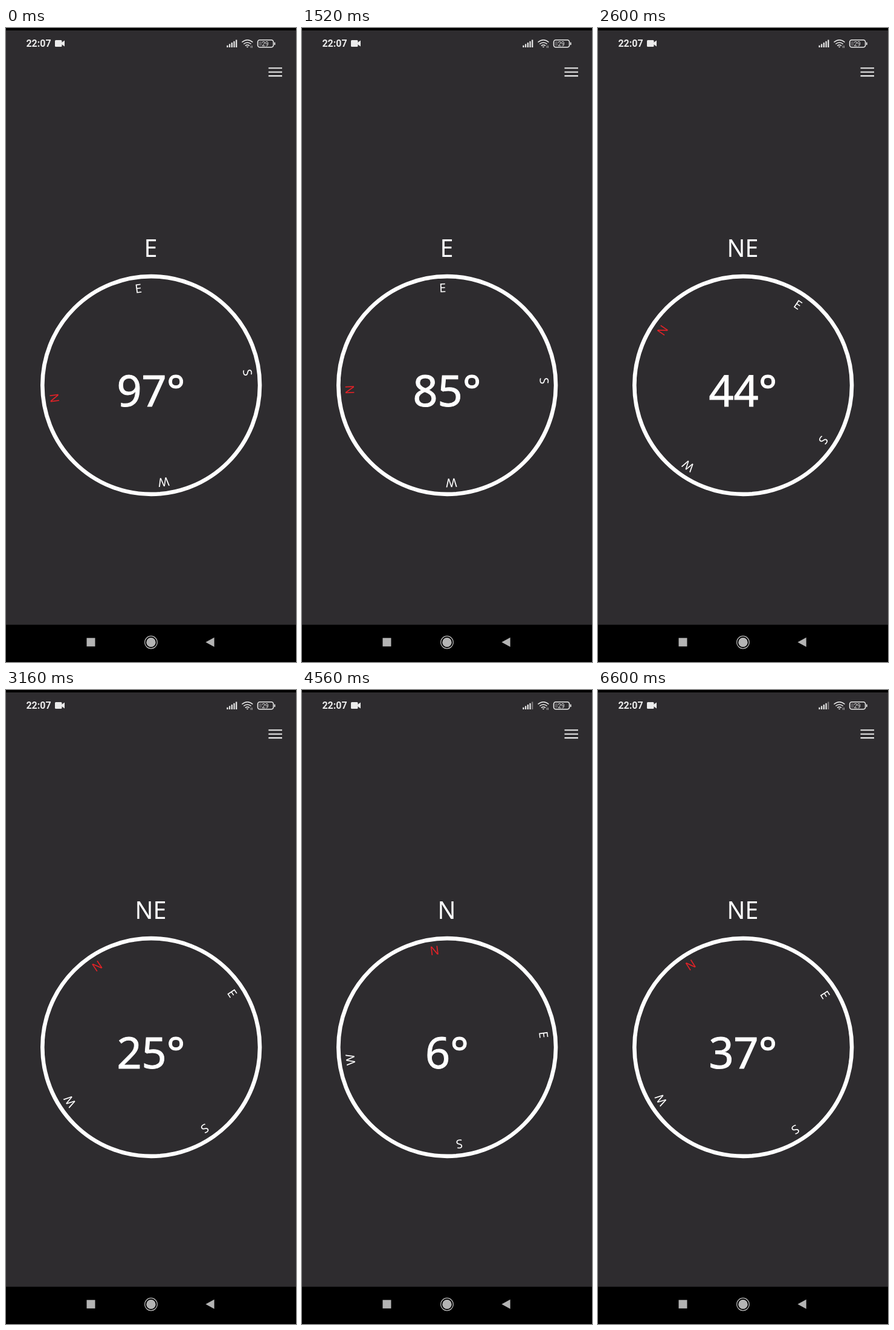
These frames come from a looping animation (480 px wide and 1047 px high, 6640 ms). An HTML page:

```html
<!DOCTYPE html>
<html lang="en">
<head>
<meta charset="utf-8">
<title>Compass</title>
<style>
  html, body { margin: 0; width: 100%; height: 100%; overflow: hidden; background: #000; }
  svg { display: block; width: 480px; height: 1047px; }
  text { font-family: "Noto Sans", "Open Sans", sans-serif; text-anchor: middle; fill: #fff; }
  #label { font-size: 39.5px; }
  #degrees { font-size: 72px; stroke: #fff; stroke-width: 1px; }
  #dial text { font-size: 20px; }
  #dial text:first-child { fill: #e32227; }
  #status text { font-family: Roboto, sans-serif; fill: #ececec; }
  .line { fill: none; stroke: #ececec; stroke-width: 1.6; }
</style>
</head>
<body>
<svg viewBox="0 0 480 1047">
  <rect y="4" width="480" height="981.5" fill="#2e2c2f"/>

  <g id="status" fill="#ececec">
    <text x="54" y="31" font-size="16" font-weight="700">22:07</text>
    <rect x="81" y="20" width="11.5" height="11" rx="1.5"/>
    <path d="M92 24L97 20.5V30.5L92 27Z"/>
    <g id="signal"></g>
    <path class="line" d="M390.5 23.5Q399.500 16 408.500 23.500M393.300 26.500Q399.500 21.500 405.700 26.500M396 29.300Q399.500 26.800 403 29.300"/>
    <path d="M397.500 30.500H401.500L399.500 32.500Z"/>
    <path d="M405.300 29V33M407.400 29V33" stroke="#aaa"/>
    <rect x="418.500" y="22" width="5" height="7.600" rx="1.500" fill="#59575a"/>
    <rect class="line" x="416.600" y="19.800" width="26" height="12" rx="3.500"/>
    <path class="line" d="M444.800 23.800V28"/>
    <text x="429" y="29.500" font-size="10">29</text>
  </g>
  <path class="line" d="M434.500 66.300h22.500m-22.500 6.400h22.500m-22.500 6.400h22.500" style="stroke-width: 2.1"/>

  <text id="label" x="239.600" y="378"></text>
  <circle cx="240.200" cy="590" r="179.900" fill="none" stroke="#fff" stroke-width="6.600"/>
  <g id="dial"></g>
  <text id="degrees" x="240" y="625.300"></text>

  <g fill="#b4b4b4">
    <rect x="133.500" y="1007.300" width="14" height="14"/>
    <circle cx="240" cy="1014.500" r="7.700"/>
    <circle cx="240" cy="1014.500" r="10.300" fill="none" stroke="#b4b4b4" stroke-width="1.300"/>
    <path d="M330.500 1014.300L344.700 1006.500V1022.100Z"/>
  </g>
</svg>
<script>
  const LOOP = 6640, STEP = 40, HOLD = 360, LAG = 260, SIGNAL_DROP = 4080;
  const NAMES = ["N", "NE", "E", "SE", "S", "SW", "W", "NW"];
  const $ = id => document.getElementById(id);

  // Compass heading at even intervals after the hold
  const GAP = 480;
  const turn = [97.5, 94.6, 91.5, 74.2, 58, 38.5, 23.3, 13.3, 8, 6.3, 9.8, 20.3, 28.5, 37.4];

  function heading(t) {
    const x = Math.max(0, t - HOLD) / GAP, last = turn.length - 1;
    const i = Math.min(Math.floor(x), last - 1), u = x - i, w = 1 - u;
    const slope = k => {
      const a = Math.max(k - 1, 0), b = Math.min(k + 1, last);
      return (turn[b] - turn[a]) / (b - a);
    };
    return w * w * ((1 + 2 * u) * turn[i] + u * slope(i))
         + u * u * ((1 + 2 * w) * turn[i + 1] - w * slope(i + 1));
  }

  $("dial").innerHTML = ["N", "E", "S", "W"].map((name, i) =>
    `<text y="-154" transform="rotate(${i * 90})">${name}</text>`).join("");

  $("signal").innerHTML = [0, 1, 2, 3, 4].map(i =>
    `<rect x="${365.4 + i * 3.7}" y="${28.7 - i * 2.3}" width="2.2" height="${3.3 + i * 2.3}"/>`).join("");

  function draw(now) {
    const t = Math.floor(now % LOOP / STEP) * STEP;
    const h = heading(t);
    $("degrees").textContent = Math.floor(h) + "°";
    $("label").textContent = NAMES[Math.round(h / 45) % 8];
    // The dial follows the heading with a short delay
    $("dial").setAttribute("transform", `translate(240 590) rotate(${-heading(t - LAG)})`);
    $("signal").lastChild.setAttribute("opacity", t < SIGNAL_DROP ? 1 : 0.4);
  }

  let start;
  function tick(now) {
    start ??= now;
    draw(now - start);
    requestAnimationFrame(tick);
  }
  draw(0);
  requestAnimationFrame(tick);
</script>
</body>
</html>
```
